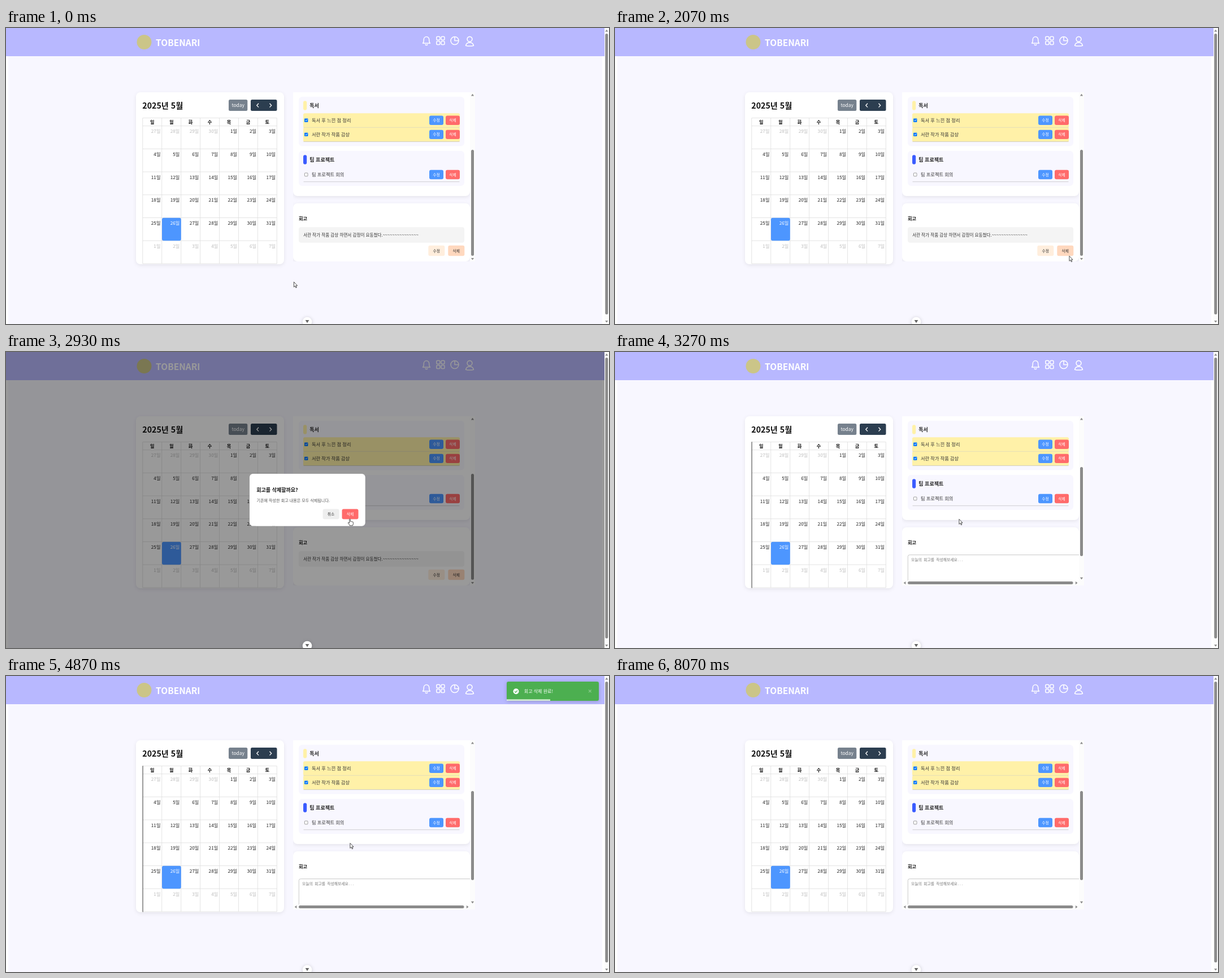
Write an HTML page that moves like this. It is 1067x525 px and loops after 8270 ms.

```html
<!DOCTYPE html>
<html lang="ko">
<head>
<meta charset="utf-8">
<title>Planner</title>
<style>
html, body { margin: 0; width: 100%; height: 100%; overflow: hidden; background: #fff; }
svg { display: block; width: 100%; height: 100%; }
text { font-family: "Noto Sans CJK KR", "Noto Sans KR", "Noto Sans CJK", "Noto Sans CJK JP", "Noto Sans", sans-serif; white-space: pre; }
.mono { font-family: "Noto Sans Mono CJK KR", "Noto Sans Mono CJK JP", "Noto Sans CJK KR", "Noto Sans Mono", monospace; }
.card { filter: drop-shadow(0 2px 3px rgba(0, 0, 0, .08)); }
.lift { filter: drop-shadow(0 1px 3px rgba(0, 0, 0, .2)); }
</style>
</head>
<body>
<svg id="stage" viewBox="0 0 1067 525" xmlns="http://www.w3.org/2000/svg"></svg>
<script>
const LOOP = 8270, FPS = 15, LAST = 123;

// Drawing helpers; boxes are given by their edges.
const box = (x1, y1, x2, y2, fill, r = 0, more = '') =>
  `<rect x="${x1}" y="${y1}" width="${x2 - x1}" height="${y2 - y1}" rx="${r}" fill="${fill}" ${more}/>`;
const text = (x, y, size, str, fill = '#222', more = '') =>
  `<text x="${x}" y="${y}" font-size="${size}" fill="${fill}" ${more}>${str}</text>`;
const line = (d, stroke, width = 1, more = '') =>
  `<path d="${d}" fill="none" stroke="${stroke}" stroke-width="${width}" ${more}/>`;
const shape = (d, fill, more = '') => `<path d="${d}" fill="${fill}" ${more}/>`;
const group = (id, body, more = '') => `<g id="${id}" ${more}>${body}</g>`;
const BOLD = 'font-weight="700"', MEDIUM = 'font-weight="500"';
const MID = 'text-anchor="middle"', END = 'text-anchor="end"';

const button = (x1, y1, x2, y2, fill, label, color) =>
  box(x1, y1, x2, y2, fill, 3) +
  text((x1 + x2) / 2, (y1 + y2) / 2 + 2.5, 6.8, label, color, MID + ' ' + MEDIUM);

const GREY = '#8b8b8b';
const arrows = {
  up: [-2.6, 1.8, 2.6, 1.8, 0, -1.8], down: [-2.6, -1.8, 2.6, -1.8, 0, 1.8],
  left: [1.8, -2.6, 1.8, 2.6, -1.8, 0], right: [-1.8, -2.6, -1.8, 2.6, 1.8, 0]
};
const arrow = (dir, x, y) =>
  `<polygon points="${arrows[dir]}" transform="translate(${x} ${y})" fill="${GREY}"/>`;

function header() {
  const icon = { stroke: '#fff', w: 1.5 };
  const squares = [[761.8, 15.3], [770, 15.3], [761.8, 23.6], [770, 23.6]]
    .map(([x, y]) => box(x, y, x + 6, y + 6, 'none', 1.5, 'stroke="#fff" stroke-width="1.5"')).join('');
  return box(0, 0, 1059, 50, '#b8b8ff') +
    '<circle cx="244.5" cy="25" r="13" fill="#cbc588"/>' +
    text(265, 31.6, 15.5, 'TOBENARI', '#fff', BOLD) +
    line('M737.5 27C739.2 25.5 739.3 23.5 739.3 20.5A4.7 4.9 0 0 1 748.7 20.5C748.7 23.5 748.8 25.5 750.5 27Z' +
      'M742.2 29.3a2 2 0 0 0 3.6 0', icon.stroke, icon.w, 'stroke-linejoin="round" stroke-linecap="round"') +
    squares +
    '<circle cx="794" cy="22.5" r="7" fill="none" stroke="#fff" stroke-width="1.5"/>' +
    line('M794 15.5V22.5H801', icon.stroke, icon.w) +
    '<circle cx="820.5" cy="19.8" r="4.4" fill="none" stroke="#fff" stroke-width="1.6"/>' +
    line('M813.5 31.2C814.5 27.3 817.3 25.8 820.5 25.8S826.5 27.3 827.5 31.2Q820.5 33 813.5 31.2Z',
      icon.stroke, icon.w, 'stroke-linejoin="round"');
}

function calendar() {
  const left = 241.8, top = 173.7, w = 33.93, h = 40.7;
  let out = box(230, 114, 492, 419, '#fff', 8, 'class="card"') +
    text(241.3, 142.8, 14.2, '2025년 5월', '#111', BOLD) +
    box(394, 127, 427.3, 147, '#76818d', 2.5) + text(410.6, 140.3, 8.4, 'today', '#fff', MID) +
    box(433, 127, 479.5, 147, '#2c3e50', 2.5) +
    line('M447 133.8L443.8 137.2L447 140.6M466.5 133.8L469.7 137.2L466.5 140.6', '#fff', 1.3);
  let grid = `M${left} 159.6H${left + 7 * w}`;
  for (let r = 0; r <= 6; r++) grid += `M${left} ${top + r * h}H${left + 7 * w}`;
  for (let c = 0; c <= 7; c++) grid += `M${left + c * w} 159.6V418`;
  out += line(grid, '#ddd', .8) + box(276, 336.8, 309.8, 377.3, '#4d96ff', 3);
  [...'일월화수목금토'].forEach((d, c) => {
    out += text(left + (c + .5) * w, 170, 8.2, d, '#111', BOLD + ' ' + MID);
  });
  for (let i = 0; i < 42; i++) {
    const n = i - 3, inMonth = n >= 1 && n <= 31;
    const day = n < 1 ? n + 30 : n > 31 ? n - 31 : n;
    const fill = n === 26 ? '#fff' : inMonth ? '#222' : '#bdbdbd';
    out += text(left + (i % 7 + 1) * w - 2.3, top + Math.floor(i / 7) * h + 12.4, 8.2, day + '일', fill, END);
  }
  return out;
}

function task(y, label, done) {
  const check = done
    ? box(528, y - 3.2, 534.4, y + 3.2, '#0075ff', 1) +
      line(`M529.4 ${y}L530.8 ${y + 1.4}L533.1 ${y - 1.5}`, '#fff', .9)
    : box(528.4, y - 2.9, 534, y + 2.9, '#fff', 1, 'stroke="#767676" stroke-width=".7"');
  return (done ? box(526, y - 12.4, 803, y + 13, '#fff1a8', 2.5) : '') +
    line(`M526.5 ${y + 12.7}H802.5`, '#c4c4c4', .8) + check +
    text(541, y + 3.1, 8.2, label, '#333') +
    button(749, y - 8.2, 774, y + 8.2, '#4d96ff', '수정', '#fff') +
    button(778, y - 8.2, 803, y + 8.2, '#ff6b6b', '삭제', '#fff');
}

function section(y1, y2, color, title) {
  return box(518, y1, 811, y2, '#f8f7ff', 6) + box(526, y1 + 7.2, 532.2, y1 + 23.7, color, 3) +
    text(537.3, y1 + 18.8, 9, title, '#222', BOLD);
}

function tasks() {
  return box(508, 90, 821, 298, '#fff', 8, 'class="card"') +
    section(122, 209.5, '#fff1a8', '독서') +
    task(163.7, '독서 후 느낀 점 정리', true) +
    task(188.9, '서란 작가 작품 감상', true) +
    section(218, 280, '#3a5bff', '팀 프로젝트') +
    task(260, '팀 프로젝트 회의', false);
}

const reviewTitle = text(518, 340.5, 8.2, '회고', '#111', BOLD);

const written = () =>
  box(508, 311, 821, 414, '#fff', 8, 'class="card"') + reviewTitle +
  box(518, 353.3, 811, 380.8, '#f4f4f4', 4) +
  text(526, 370.3, 7.6, '서란 작가 작품 감상 하면서 감정이 요동쳤다.' + '~'.repeat(15), '#333') +
  button(747.3, 385.7, 776.3, 404.3, '#ffeedd', '수정', '#333') +
  button(782.3, 385.7, 811.3, 404.3, '#ffd8be', '삭제', '#333') +
  box(821, 114, 830, 414, '#fcfcfc') + arrow('up', 825.5, 118.6) +
  box(823, 216, 828, 404, GREY, 2.5) + arrow('down', 825.5, 409.8);

const empty = () =>
  box(508, 311, 821, 440, '#fff', 8, 'class="card"') + reviewTitle +
  box(518.3, 359.8, 850, 430, '#fff', 3, 'stroke="#bbb" stroke-width=".8"') +
  text(524, 371.2, 6.8, '오늘의 회고를 작성해보세요...', '#757575', 'class="mono"') +
  box(508, 405.3, 830, 414, '#fcfcfc') + box(821, 114, 830, 414, '#fcfcfc') +
  arrow('up', 825.5, 118.6) + box(823, 204, 828, 362, GREY, 2.5) + arrow('down', 825.5, 401.6) +
  arrow('left', 512.5, 409.6) + box(518, 407.1, 810.5, 412.1, GREY, 2.5) + arrow('right', 816.7, 409.6);

const modal = () =>
  box(0, 0, 1059, 525, '#000', 0, 'opacity=".4"') +
  box(431, 216, 635.7, 308.8, '#fff', 6) +
  text(443.3, 247.5, 9, '회고를 삭제할까요?', '#111', BOLD) +
  text(443.5, 266, 7.1, '기존에 작성한 회고 내용은 모두 삭제됩니다.', '#555') +
  button(560.6, 278.4, 589.5, 296.6, '#eee', '취소', '#333') +
  button(594.5, 278.4, 623.5, 296.6, '#ff6b6b', '삭제', '#fff');

const toast = () =>
  box(886, 10, 1049, 44, '#4caf50', 3, 'class="lift"') +
  '<circle cx="902.5" cy="27.2" r="5" fill="#fff"/>' +
  line('M900.1 27.4L901.8 29.1L905 25.6', '#4caf50', 1.3) +
  text(916.8, 29.8, 8, '회고 삭제 완료!', '#fff', MEDIUM) +
  line('M1031 24.5L1035.6 29.1M1035.6 24.5L1031 29.1', '#fff', 1.2, 'opacity=".35"') +
  '<rect id="bar" x="886" y="41.3" width="0" height="2.7" fill="#fff" opacity=".75"/>';

const downBadge = '<circle cx="533" cy="521" r="8.3" fill="#fff" class="lift"/>' +
  shape('M529.7 518H536.3L533 523.3Z', '#666');
const pageScroll = box(1059, 0, 1067, 525, '#fcfcfc') + arrow('up', 1062.8, 4.6) +
  box(1060.3, 10, 1065.3, 508, GREY, 2.5) + arrow('down', 1062.8, 520.8);

const OUTLINE = 'stroke="#222" stroke-width=".8" stroke-linejoin="round"';
const pointer = shape('M.4 .4V9.4L2.4 7.5L3.9 10.8L5.3 10.2L3.8 7H6.6Z', '#fff', OUTLINE);
const hand = shape('M-.9 1.2Q-.9 .3 0 .3T.9 1.2V4.6Q2 3.8 2.8 4.9Q3.9 4.3 4.5 5.4Q5.9 5 5.9 6.4' +
  'V8.4Q5.9 9.9 4.9 11.8H-.3Q-1 10-3 7.7Q-3.6 6.5-2.6 6.3Q-1.8 6.3-.9 7.5Z', '#fff', OUTLINE);

document.getElementById('stage').innerHTML =
  '<clipPath id="pane"><rect x="508" y="114" width="322" height="300"/></clipPath>' +
  box(0, 0, 1067, 525, '#fff') + box(4, 50, 1055, 525, '#f8f7ff') +
  header() + calendar() + box(241.6, 159.3, 242.6, 418.6, '#444', 0, 'id="caret"') +
  `<g clip-path="url(#pane)">${tasks()}${group('written', written())}${group('empty', empty())}</g>` +
  group('modal', modal()) + downBadge + group('toast', toast()) + pageScroll +
  group('pointer', pointer) + group('hand', hand);

const el = id => document.getElementById(id);
const show = (id, on) => el(id).setAttribute('display', on ? 'inline' : 'none');
const place = (id, x, y) => el(id).setAttribute('transform', `translate(${x} ${y})`);

// CSS-style cubic bezier, solved by bisection.
const bezier = (x1, y1, x2, y2) => p => {
  const at = (a, b, s) => 3 * a * s * (1 - s) ** 2 + 3 * b * s * s * (1 - s) + s ** 3;
  let lo = 0, hi = 1;
  for (let i = 0; i < 24; i++) {
    const s = (lo + hi) / 2;
    if (at(x1, x2, s) < p) lo = s; else hi = s;
  }
  return at(y1, y2, lo);
};
const linear = p => p;
const easeOut = bezier(.215, .61, .355, 1), ease = bezier(.25, .1, .25, 1);

// Each key is [time, value, value, ...].
function track(keys, t, easing = linear) {
  if (t <= keys[0][0]) return keys[0].slice(1);
  for (let i = 1; i < keys.length; i++) {
    const a = keys[i - 1], b = keys[i];
    if (t < b[0]) {
      const p = easing((t - a[0]) / (b[0] - a[0]));
      return a.slice(1).map((v, j) => v + (b[j + 1] - v) * p);
    }
  }
  return keys[keys.length - 1].slice(1);
}

// Ticks of 1/15 s.
const MODAL = 32, DELETED = 49, HIDDEN = 110, IN = 50.2, OUT = 96.8, TICKS = 10.5;
const path = [[0, 509, 450], [1, 545, 446], [2, 615, 434], [4, 752, 410], [5, 768, 412], [8, 768, 412],
  [9, 769, 415], [11, 767, 448.5], [19, 767, 448.5], [20, 768, 446], [22, 779, 431], [24, 798, 409],
  [25, 803, 404], [29, 803, 404], [30, 803.5, 404], [33, 803.5, 404], [34, 796, 398], [36, 748, 356],
  [38, 688, 306], [40, 644, 284], [41, 633, 286], [42, 633, 286], [43, 620, 290], [44, 608.5, 296]];
const blinks = [49, 57, 65, 74, 81, 89, 97, 105, 113, 121];
const bounceIn = [[0, 3000, 0], [.6, -25, 1], [.75, 10, 1], [.9, -5, 1], [1, 0, 1]];
const bounceOut = [[0, 0, 1], [.2, -20, 1], [1, 2000, 0]];
const ZOOM = 1067 / 1920;

function draw(ms) {
  const n = Math.min(LAST, Math.floor(ms * FPS / 1000 + .06));
  const deleted = n >= DELETED;
  show('written', !deleted);
  show('empty', deleted);
  show('modal', n >= MODAL && !deleted);
  show('caret', blinks.filter(b => b <= n).length % 2 === 1);

  const [x, y] = track(path, n);
  const onButton = n >= 43 && !deleted;
  show('hand', onButton);
  show('pointer', !onButton && n < HIDDEN);
  place('hand', x, y);
  place('pointer', x, y);

  const [shift, alpha] = n < OUT
    ? track(bounceIn, (n - IN) / TICKS, easeOut)
    : track(bounceOut, (n - OUT) / TICKS, ease);
  show('toast', n > IN && n < OUT + TICKS);
  place('toast', shift * ZOOM, 0);
  el('toast').setAttribute('opacity', alpha);
  el('bar').setAttribute('width', Math.max(0, 163 * (1 - (n - 49.25) / 45)));
}

function tick() {
  draw(performance.now() % LOOP);
  requestAnimationFrame(tick);
}
tick();
</script>
</body>
</html>
```
